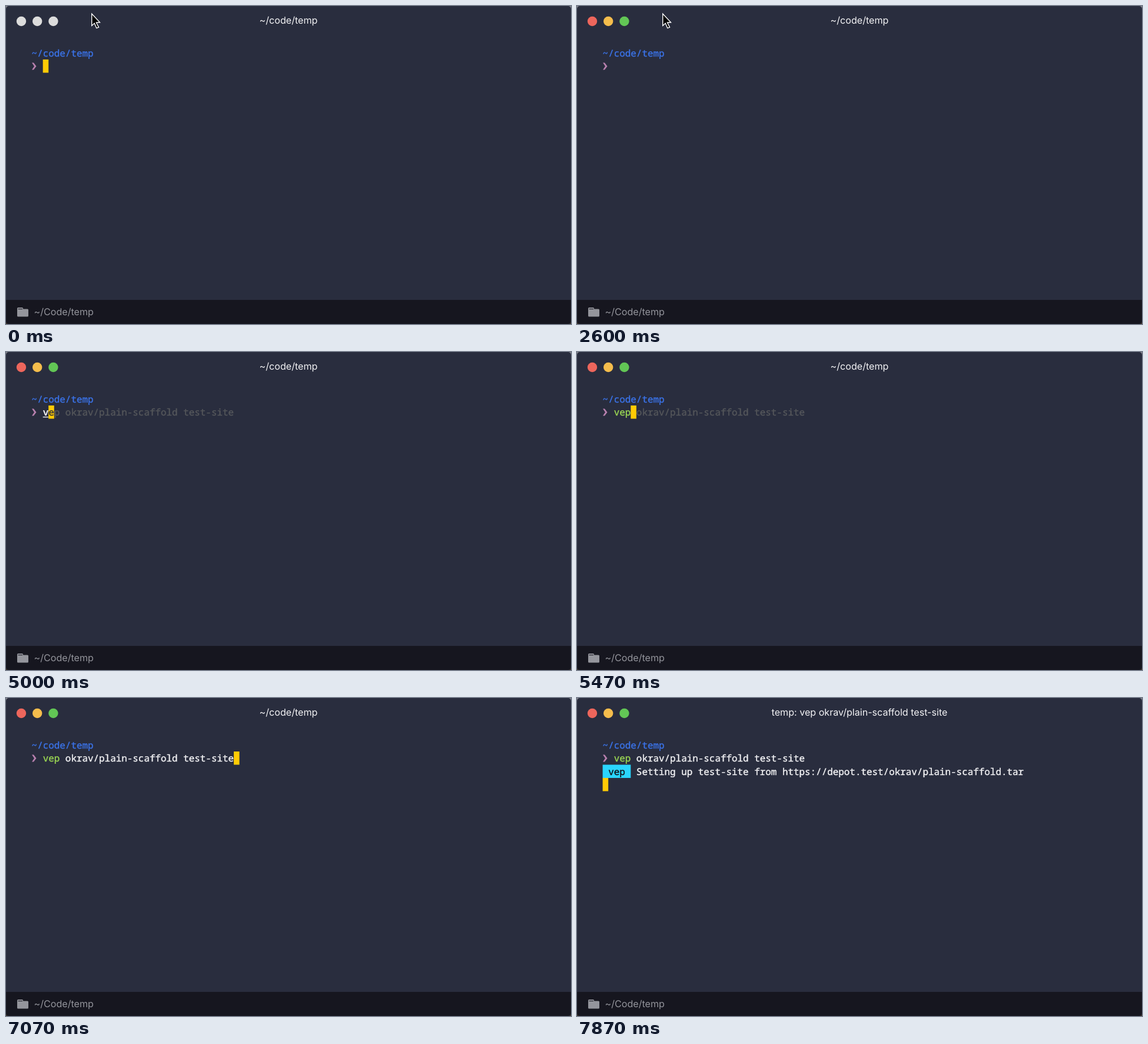
Write an HTML page with a canvas that moves like this. It is 960x541 px and loops after 8000 ms.

```html
<!DOCTYPE html>
<html lang="en">
<head>
<meta charset="utf-8">
<style>
  html, body { margin: 0; width: 100%; height: 100%; overflow: hidden; background: #292d3e; }
  canvas { display: block; }
</style>
</head>
<body>
<canvas id="stage" width="960" height="541"></canvas>
<script>
const ctx = document.getElementById('stage').getContext('2d');
ctx.textRendering = 'geometricPrecision';

const LOOP = 8000;
const LEFT = 43.6, TOP = 68.5, CELL = 9.54, ROW = 22.5;
const BG = '#292d3e', WHITE = '#f4f4f6', YELLOW = '#ffcb05';
const BLUE = '#3b73e8', GREEN = '#9ad653', GHOST = '#55575b';
const TOOL = 'vep', REPO = 'okrav/plain-scaffold';
const COMMAND = `${TOOL} ${REPO} test-site`;
const OUTPUT = `Setting up test-site from https://depot.test/${REPO}.tar`;

// [time, characters entered]
const KEYS = [[4530, 1], [5130, 2], [5270, 3], [5870, COMMAND.length]];
const FOCUS = 1870, POINTER_HIDE = 2670, ENTER = 7200, PRINT = 7330;

const colX = col => LEFT + col * CELL;
const rowY = row => TOP + row * ROW;
const ramp = (t, from, to) => {
  const p = Math.min(1, Math.max(0, (t - from) / (to - from)));
  return p * p * (3 - 2 * p);
};

function rect(color, x, y, w, h) {
  ctx.fillStyle = color;
  ctx.fillRect(x, y, w, h);
}

function polygon(color, ...points) {
  ctx.beginPath();
  points.forEach(([x, y]) => ctx.lineTo(x, y));
  ctx.closePath();
  ctx.fillStyle = color;
  ctx.fill();
}

function circle(x, y, r) {
  ctx.beginPath();
  ctx.arc(x, y, r, 0, Math.PI * 2);
}

// A thin outline gives the terminal text its medium weight.
function mono(text, col, row, color, outline = 0.4) {
  ctx.font = '15.9px "Noto Sans Mono", monospace';
  ctx.textAlign = 'left';
  ctx.fillStyle = ctx.strokeStyle = color;
  ctx.lineWidth = outline;
  [...text].forEach((ch, i) => {
    ctx.fillText(ch, colX(col + i), rowY(row) + 17);
    ctx.strokeText(ch, colX(col + i), rowY(row) + 17);
  });
}

function label(text, x, y, color, align) {
  ctx.font = '16.1px Inter, sans-serif';
  ctx.textAlign = align;
  ctx.fillStyle = color;
  ctx.fillText(text, x, y);
}

function drawWindow(t) {
  rect('#85868f', 0, 0, 960, 270);
  rect('#3a3026', 0, 270, 960, 271);
  ctx.save();
  ctx.beginPath();
  ctx.roundRect(0, 0, 960, 541, 5);
  ctx.clip();
  rect(BG, 0, 0, 960, 541);
  rect('#16161f', 0, 500, 960, 41);
  ctx.restore();

  const lights = t < FOCUS ? Array(3).fill('#dcdcdc') : ['#ed665c', '#f5bd4c', '#62c655'];
  lights.forEach((color, i) => {
    circle(26 + i * 27.2, 26, 8.2);
    ctx.fillStyle = color;
    ctx.fill();
  });
  label(t < ENTER ? '~/code/temp' : `temp: ${COMMAND}`, 480, 30, WHITE, 'center');

  ctx.fillStyle = '#94959c';
  ctx.beginPath();
  ctx.roundRect(19, 513, 10, 8, 1.5);
  ctx.roundRect(19, 515.5, 19, 13, 1.5);
  ctx.fill();
  rect('#16161f', 20.5, 515, 7.5, 1);
  label('~/Code/temp', 47.6, 526, '#94959c', 'left');
}

function cursorAlpha(t) {
  if (t >= KEYS[0][0]) return ramp(t, KEYS[0][0] - 100, KEYS[0][0] + 200);
  const phase = t % 2000;
  return phase < 1000 ? 1 - ramp(phase, 0, 400) : ramp(phase, 1000, 1400);
}

function drawCursor(t, col, row) {
  ctx.globalAlpha = cursorAlpha(t);
  rect(YELLOW, colX(col), rowY(row), CELL, ROW);
  ctx.globalAlpha = 1;
}

function drawTerminal(t) {
  mono('~/code/temp', 0, 0, BLUE);
  polygon('#b780ae', [44, 96.5], [47, 96.5], [51.5, 102.5], [47, 108.5], [44, 108.5], [48, 102.5]);

  const typed = KEYS.reduce((n, [time, count]) => t >= time ? count : n, 0);
  const known = typed >= TOOL.length;
  if (typed) {
    mono(COMMAND.slice(typed), 2 + typed, 1, GHOST);
    mono(COMMAND.slice(0, Math.min(typed, TOOL.length)), 2, 1, known ? GREEN : WHITE, known ? 0.4 : 0.7);
    mono(COMMAND.slice(TOOL.length, typed), 2 + TOOL.length, 1, WHITE);
    if (!known) rect(WHITE, colX(2), 110, typed * CELL, 1.3);
  }

  if (t < ENTER) {
    drawCursor(t, 2 + typed, 1);
    if (typed) mono(COMMAND.charAt(typed), 2 + typed, 1, BG);
  } else if (t < PRINT) {
    drawCursor(t, 0, 2);
  } else {
    rect('#2ad5fd', LEFT, rowY(2), 5 * CELL, ROW);
    mono(TOOL, 1, 2, '#10131a');
    mono(OUTPUT, 6, 2, WHITE);
    drawCursor(t, 0, 3);
  }
}

function drawPointer(t) {
  if (t >= POINTER_HIDE) return;
  const press = t < 1600 ? 0 : 1 - ramp(t, 1850, 2000);
  if (press) {
    ctx.globalAlpha = press;
    for (const [r, width, color] of [[29.5, 3, '#15161e'], [30.7, 1.1, '#e4e4e8'], [28.2, 1.1, '#e4e4e8']]) {
      circle(146, 15, r);
      ctx.lineWidth = width;
      ctx.strokeStyle = color;
      ctx.stroke();
    }
    ctx.globalAlpha = 1;
  }
  polygon('#fff', [145, 11.5], [161, 28.5], [154.5, 29], [158.5, 36.5], [153.5, 38.5], [150, 30.5], [145, 35]);
  polygon('#000', [146.4, 15], [158, 27.2], [152.3, 27.5], [156.6, 35.7], [154.2, 36.8], [150.5, 28.2], [146.4, 32]);
}

function draw(now) {
  const t = now % LOOP;
  drawWindow(t);
  drawTerminal(t);
  drawPointer(t);
  requestAnimationFrame(draw);
}
requestAnimationFrame(draw);
</script>
</body>
</html>
```
